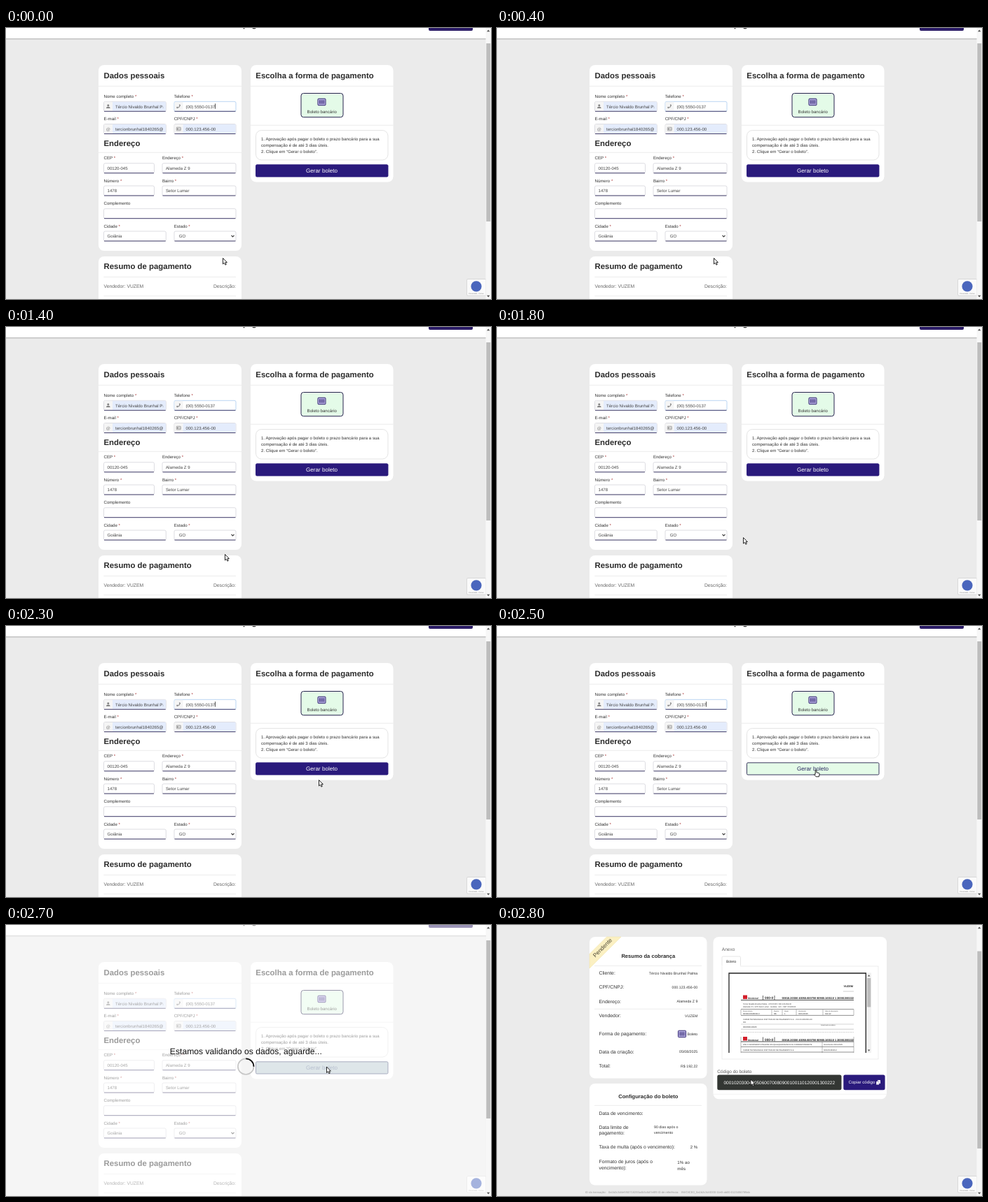
These frames come from a looping animation (692 px wide and 388 px high, 5.1 s). An HTML page:

```html
<!DOCTYPE html>
<html lang="pt-BR">
<head>
<meta charset="utf-8">
<title>Pagamento</title>
<style>
  html, body { margin: 0; width: 100%; height: 100%; overflow: hidden; background: #ebebeb; }
  svg { display: block; width: 100vw; height: 100vh; font-family: "Liberation Sans", Arial, sans-serif; text-rendering: geometricPrecision; }
  text { white-space: pre; }
</style>
</head>
<body>
<svg id="stage" viewBox="0 0 692 388"></svg>
<script>
const NAVY = '#2a1a7c', INK = '#333', LINE = '#e4e4e4';
const person = 'Tércio Nivaldo Brunhal Palma', vendor = 'VUZEM';
const taxId = '000.123.456-00', street = 'Alameda Z 9';
const digits = '00010203004005060070080900100110120001300222';

const rect = (x1, y1, x2, y2, fill, radius = 0, extra = '') =>
  `<rect x="${x1}" y="${y1}" width="${x2 - x1}" height="${y2 - y1}" rx="${radius}" fill="${fill}" ${extra}/>`;
const frame = (x1, y1, x2, y2, stroke, radius = 0, fill = 'none', width = .7) =>
  rect(x1, y1, x2, y2, fill, radius, `stroke="${stroke}" stroke-width="${width}"`);
const path = (d, extra) => `<path d="${d}" ${extra}/>`;
const rule = (x1, x2, y, color = LINE, width = .7) =>
  path(`M${x1} ${y}H${x2}`, `stroke="${color}" stroke-width="${width}"`);
const text = (x, y, content, size = 6.1, fill = INK, extra = '') =>
  `<text x="${x}" y="${y}" font-size="${size}" fill="${fill}" ${extra}>${content}</text>`;
const bold = (x, y, content, size, extra = '') =>
  text(x, y, content, size, '#2b2b2b', `font-weight="700" ${extra}`);
const end = (x, y, content, size = 5.25, fill = INK) => text(x, y, content, size, fill, 'text-anchor="end"');
const middle = 'text-anchor="middle"';
const card = (x1, y1, x2, y2) => rect(x1, y1, x2, y2, '#fff', 8);

const label = (x, y, content, required = true) =>
  text(x, y, content + (required ? ' <tspan fill="#a33">*</tspan>' : ''));

function field(x1, x2, y, value = '', { icon, filled, focus } = {}) {
  const clipId = `clip${x1}-${y}`.replace('.', '_');
  const left = icon ? x1 + 12.5 : x1;
  const textX = icon ? x1 + 16.5 : x1 + 5;
  return frame(x1, y, x2, y + 14, focus ? '#9dc3ee' : '#cfcfd6', 2, '#fff')
    + (icon ? rect(x1 + .5, y + .5, left, y + 13.2, '#f5f5f5', 1) : '')
    + (filled ? rect(left, y + .4, x2 - .4, y + 13.4, '#e4ecfc') : '')
    + rule(x1 + .5, x2 - .5, y + 14, '#35305f', .9)
    + (icon ? `<g transform="translate(${x1 + 6.3} ${y + 7})">${icon}</g>` : '')
    + `<clipPath id="${clipId}">${rect(x1, y, x2 - 4, y + 14, '#000')}</clipPath>`
    + text(textX, y + 9.3, value, 6.1, '#444', `clip-path="url(#${clipId})"`);
}

const GREY = '#858585';
const icons = {
  user: `<circle cy="-1.5" r="1.5" fill="${GREY}"/>` + path('M-2.7 2.8V2Q-2.5 .4-1 .4H1Q2.5 .4 2.7 2V2.8Z', `fill="${GREY}"`),
  phone: path('M-2.6 2.3Q1.4 1.8 2.2-2.3', `fill="none" stroke="${GREY}" stroke-width="1.2"`)
    + path('M-2.8 1.6l1.5-.8M1 -1.4l.8-1.3', `stroke="${GREY}" stroke-width="1.4"`),
  at: text(0, 2, '@', 6, GREY, middle),
  idCard: frame(-3, -2.3, 3, 2.3, GREY, .5) + rect(-2.1, -1.1, -.3, 1.2, GREY)
    + rule(.5, 2.3, -.7, GREY) + rule(.5, 2.3, .9, GREY)
};

const slipIcon = (x, y) => `<g transform="translate(${x} ${y})">`
  + frame(0, 0, 11, 9.5, '#31256f', 1, '#b9b2e4', 1)
  + path('M2.5 2v5.5M4.5 2v5.5M6.5 2v5.5M8.5 2v5.5', 'stroke="#31256f" stroke-width="1"') + '</g>';

const scrollbar = (top, bottom) => rect(684.5, 0, 692, 388, '#f7f7f7')
  + rect(685.3, top, 691.2, bottom, '#bdbdbd')
  + path('M686 5.2h4.4l-2.2-2.6zM686 382.8h4.4l-2.2 2.6z', 'fill="#555"');

const badge = rect(657.3, 359.3, 685.5, 383.5, '#d2d2d2', 1.5) + rect(658, 360, 684.5, 382.8, '#fafafa', 1)
  + '<circle cx="671" cy="369.8" r="7.6" fill="#4a66bd"/>'
  + text(671, 380.8, 'Privacidade - Termos', 2.3, '#777', middle);

function checkout() {
  return rect(0, 0, 692, 388, '#ebebeb')
    + rect(0, 0, 685, 15, '#fff') + rule(0, 685, 15.4, '#b5b5b5', 1) + rule(0, 685, 16.4, '#dcdcdc', 1)
    + bold(338, -1.4, 'pag', 11) + rect(603, -8, 666, 4, '#2b1c66', 2)
    + card(132, 53, 336, 319) + card(132, 327, 336, 400) + card(349, 53, 552.5, 220.5)
    + bold(139.5, 71.5, 'Dados pessoais', 11.4) + rule(132, 336, 83.3)
    + label(139.5, 100, 'Nome completo') + label(239.7, 100, 'Telefone')
    + field(139.5, 228.3, 105.3, person, { icon: icons.user, filled: true })
    + field(240, 328, 105.3, '(00) 5550-0137', { icon: icons.phone, focus: true })
    + label(139.5, 132.2, 'E-mail') + label(239.7, 132.2, 'CPF/CNPJ')
    + field(139.5, 228.3, 137.5, 'tercionbrunhal1840265@', { icon: icons.at, filled: true })
    + field(240, 328, 137.5, taxId, { icon: icons.idCard, filled: true })
    + bold(139.5, 169, 'Endereço', 11.4) + rule(132, 336, 178.3)
    + label(139.5, 188.2, 'CEP') + label(222.9, 188.2, 'Endereço')
    + field(139.5, 211.5, 193.7, '00120-045') + field(223, 328, 193.7, street)
    + label(139.5, 220.5, 'Número') + label(222.9, 220.5, 'Bairro')
    + field(139.5, 211.5, 226, '1478') + field(223, 328, 226, 'Setor Lumar')
    + label(139.5, 253.3, 'Complemento', false) + field(139.5, 328, 258.7)
    + label(139.5, 285.5, 'Cidade') + label(239.7, 285.5, 'Estado')
    + field(139.5, 228.3, 291, 'Goiânia') + field(240, 328, 291, ' GO')
    + path('M321.5 296.9l2 2 2-2', 'fill="none" stroke="#333" stroke-width="1.1"')
    + bold(139.5, 344.7, 'Resumo de pagamento', 11.4) + rule(139.5, 328, 356.5)
    + text(139.5, 372.2, 'Vendedor: ' + vendor, 6.8, '#666') + end(328, 372.2, 'Descrição:', 6.8, '#666')
    + rule(139.5, 328, 383.7)
    + bold(356.3, 71.5, 'Escolha a forma de pagamento', 11.4) + rule(349, 552.5, 83.3)
    + frame(421, 93.5, 481, 127.7, '#28234f', 3.5, '#e4fbe8', 1)
    + slipIcon(445, 101.2) + text(450.8, 122, 'Boleto bancário', 6.1, INK, middle) + rule(349, 552.5, 139.2)
    + frame(356.5, 146.5, 545, 189, '#d9d9d9', 8)
    + text(364, 160.8, '1. Aprovação após pagar o boleto o prazo bancário para a sua')
    + text(364, 169.9, 'compensação é de até 3 dias úteis.')
    + text(364, 179, '2. Clique em “Gerar o boleto”.')
    + '<g id="button"></g>'
    + `<path id="caret" d="M298.5 108.3v7.4" stroke="#222" stroke-width=".8"/>`;
}

function slip(y) {
  return rect(351, y - 5.5, 357, y, '#d3202c') + bold(358, y, 'Montenal', 3.4)
    + bold(382, y, '000-0', 4.8) + path(`M379.5 ${y - 5}v6M396 ${y - 5}v6`, 'stroke="#222" stroke-width=".7"')
    + end(509, y, '<tspan font-weight="700">00010.20300 40050.600700 80900.100110 1 20001300222</tspan>', 3.9, '#111')
    + rule(348, 509, y + 1.5, '#222', .8);
}

function slipDocument() {
  const tiny = (x, y, content, size = 2.6) => text(x, y, content, size, '#222');
  const columns = [348, 392, 407, 427, 465, 509];
  return '<clipPath id="page">' + rect(331, 68, 527, 183, '#000') + '</clipPath><g clip-path="url(#page)">'
    + rect(331, 68, 527, 183, '#fff')
    + end(508, 89.3, `<tspan font-weight="700">${vendor}</tspan>`, 3.9, '#222') + rule(494, 509, 95, '#999', .5)
    + slip(106)
    + tiny(351, 113.6, `${person} - CPF/CNPJ: ${taxId}`)
    + tiny(351, 117.6, `${street}, 1478 Setor Lumar - Goiânia - GO - CEP: 00120045`)
    + rule(348, 509, 120.6, '#444', .6)
    + ['Nosso número', 'Espécie', 'Quant.', 'Vencimento', 'Valor do documento'].map((name, i) =>
        tiny(columns[i] + 3, 123.8, name, 2.1)
        + tiny(columns[i] + 3, 127.5, ['00/00120045006-0', 'R$', '1', '03/11/2025', '192,22'][i], 2.8)).join('')
    + path(columns.map(x => `M${x} 121v8`).join(''), 'stroke="#777" stroke-width=".5"')
    + rule(348, 509, 129.4, '#444', .6)
    + tiny(351, 135.8, `${vendor} TECNOLOGIA E INSTITUICAO DE PAGAMENTO S.A. - 00.120.045/0001-00`)
    + tiny(351, 140, '001') + rule(348, 509, 142, '#aaa', .5)
    + tiny(351, 147.2, '000/000120045', 2.8) + tiny(462, 144.2, 'Autenticação mecânica', 2)
    + rule(348, 509, 149.2, '#999', .5)
    + path('M348 153.5H509', 'stroke="#999" stroke-width=".5" stroke-dasharray="1.5 1"')
    + slip(165.5)
    + tiny(351, 172, 'ATE O VENCIMENTO PAGAVEL EM QUALQUER BANCO OU CORRESPONDENTE') + tiny(466, 172, 'Vencimento 03/11/2025')
    + rule(348, 509, 174.3, '#444', .6)
    + tiny(351, 180, `${vendor} TECNOLOGIA E INSTITUICAO DE PAGAMENTO S.A.`) + tiny(466, 180, '0001/0120045-0')
    + path('M464 167v16M348 160v23M509 160v23', 'stroke="#777" stroke-width=".5"')
    + rule(348, 509, 182, '#444', .6) + '</g>'
    + path('M331 183V69H526.3V183', 'fill="none" stroke="#222" stroke-width="1.3"')
    + rect(527, 68.5, 534, 183, '#f1f1f1') + rect(528, 76, 533.3, 117.5, '#bdbdbd')
    + path('M528.8 73.5h3.6l-1.8-2.2zM528.8 178.5h3.6l-1.8 2.2z', 'fill="#555"');
}

function invoice() {
  const rows = [['Cliente:', person, 71], ['CPF/CNPJ:', taxId, 91], ['Endereço:', street, 111.5], ['Vendedor:', vendor, 132.2],
    ['Forma de pagamento:', 'Boleto', 158.3], ['Data da criação:', '05/08/2025', 183.7], ['Total:', 'R$ 192,22', 204]];
  return rect(0, 0, 692, 388, '#ebebeb')
    + card(132, 17, 299.5, 219.5) + card(132, 227, 299.5, 372.5) + card(308.5, 17, 556, 249.3)
    + path('M156.5 17H177L132 62V41.5Z', 'fill="#fbf0c2" stroke="#efe2a6" stroke-width=".5"')
    + text(0, 0, 'Pendente', 8.1, '#4a4634', `${middle} transform="translate(152.4 34.6) rotate(-45)"`)
    + bold(215.8, 47.2, 'Resumo da cobrança', 7.6, middle) + rule(139, 292, 58.4) + rule(139, 292, 120.3)
    + rows.map(([name, value, y]) => text(145.5, y, name, 6.9) + end(286.3, y - .5, value)).join('')
    + slipIcon(258.5, 151.2)
    + bold(215.8, 247.6, 'Configuração do boleto', 7.6, middle) + rule(139, 292, 258.4)
    + text(145.5, 271.5, 'Data de vencimento:', 6.9)
    + text(145.5, 291.6, 'Data limite de', 6.9) + text(145.5, 299.8, 'pagamento:', 6.9)
    + text(224, 291.2, '90 dias após o', 5.3) + text(224, 299.2, 'vencimento', 5.3)
    + text(145.5, 320, 'Taxa de multa (após o vencimento):', 6.85) + end(286.3, 320.2, '2 %', 6.1)
    + text(145.5, 341.4, 'Formato de juros (após o', 6.85) + text(145.5, 349.8, 'vencimento):', 6.85)
    + text(257.3, 341.7, '1% ao', 6.2) + text(257.3, 350.7, 'mês', 6.2)
    + text(126, 383.5, 'ID da transação:   0a1b2c3d4e5f60718293a4b5c6d7e8f9 ID de referência:   INVOICE0_0a1b2c3d-0000-11e0-ab00-0123456789ab', 4.05, '#999')
    + text(320.8, 36.6, 'Anexo', 6.6, '#666')
    + frame(321, 59, 544, 192, LINE) + frame(321, 45, 347.5, 59, '#dcdcdc', 1.5, '#fff')
    + rect(321.4, 58, 347.1, 60, '#fff') + text(334.2, 54, 'Boleto', 5.1, INK, middle)
    + slipDocument()
    + text(314.3, 212, 'Código do boleto', 6.5, '#555')
    + rect(314.3, 214.5, 491.5, 236.3, '#333633', 2.5) + text(323.5, 227.5, digits, 6.5, '#fff')
    + rect(494.3, 214.5, 553.6, 236.3, NAVY, 2.5) + text(501.5, 227.4, 'Copiar código', 6.15, '#fff')
    + rect(543, 222, 547, 227, '#fff', .6) + rect(541, 223.7, 545.2, 228.8, '#fff', .6, `stroke="${NAVY}" stroke-width=".4"`)
    + rule(308.5, 556, 242.3, '#ececec');
}

const button = (fill, ink, border) => frame(356.5, 195.8, 545, 213, border, 1.5, fill, .9) + text(450.5, 207.4, 'Gerar boleto', 8.1, ink, middle);
const buttons = {
  idle: button(NAVY, '#fff', NAVY),
  hover: button('#e4fbe8', '#2a2760', '#28234f'),
  pressed: button('#bacbd0', '#66779a', '#39406e')
};

const waiting = rect(0, 0, 684.5, 388, '#fff', 0, 'opacity=".53"')
  + text(342.3, 184.8, 'Estamos validando os dados, aguarde...', 12.16, '#111', middle)
  + '<circle cx="342.2" cy="202.7" r="11.3" fill="#f3f3f3" fill-opacity=".6" stroke="#c6c6c6" stroke-width="1.7"/>'
  + path('M342.2 191.4a11.3 11.3 0 0 1 11.3 11.3', 'fill="none" stroke="#111" stroke-width="1.7"');

const outline = 'fill="#fff" stroke="#111" stroke-width=".9" stroke-linejoin="round"';
const arrow = path('M.5 .5V9l2-1.8 1.4 3 1.4-.7L4 6.6H6.4Z', outline);
const hand = path('M-.8 6V.9Q0-.4 .9 .9V4L4.2 4.7Q5.2 5 5.1 6.3L4.4 10H.1L-2.6 6.8Q-2.2 5.4-.8 6.8Z', outline);

const stage = document.getElementById('stage');
stage.innerHTML = `<g id="checkout">${checkout()}</g><g id="waiting">${waiting}</g><g id="invoice">${invoice()}</g>`
  + badge + '<g id="bar"></g><g id="cursor"></g>';
const part = Object.fromEntries([...stage.querySelectorAll('g[id], #caret')].map(node => [node.id, node]));
const show = (node, visible) => { node.style.display = visible ? '' : 'none'; };
const fill = (node, markup) => {
  if (node.markup !== markup) node.innerHTML = node.markup = markup;
};

// [time, x, y]; the pointer rests between pairs with equal positions
const track = [[0, 309, 329], [600, 309, 329], [800, 312, 325], [1700, 312, 325], [1800, 351, 301],
  [2000, 402, 259], [2300, 446, 220], [2400, 453, 209], [2600, 457, 202.5], [2700, 457, 202.5], [2800, 361.5, 220.5]];

function pointerAt(time) {
  const next = track.findIndex(([t]) => t > time);
  if (next < 0) return track.at(-1).slice(1);
  const [t0, x0, y0] = track[next - 1], [t1, x1, y1] = track[next];
  const k = (time - t0) / (t1 - t0);
  return [x0 + (x1 - x0) * k, y0 + (y1 - y0) * k];
}

function draw(now) {
  const time = Math.floor(now % 5100 / 100) * 100;
  const paid = time >= 2800, validating = time >= 2700 && !paid;
  const hovering = time >= 2400 && time < 2700;
  show(part.checkout, !paid);
  show(part.waiting, validating);
  show(part.invoice, paid);
  show(part.caret, Math.floor((time + 400) / 600) % 2 === 0);
  fill(part.button, validating ? buttons.pressed : hovering ? buttons.hover : buttons.idle);
  fill(part.bar, paid ? scrollbar(37.5, 320) : scrollbar(22, 277));
  fill(part.cursor, hovering ? hand : arrow);
  part.cursor.setAttribute('transform', `translate(${pointerAt(time)})`);
  badgeVeil.style.display = validating ? '' : 'none';
}

const badgeVeil = document.createElementNS('http://www.w3.org/2000/svg', 'rect');
for (const [name, value] of Object.entries({ x: 657, y: 359, width: 27.5, height: 25, fill: '#fff', opacity: .5 }))
  badgeVeil.setAttribute(name, value);
stage.insertBefore(badgeVeil, part.bar);

const start = performance.now();
(function tick() {
  draw(performance.now() - start);
  requestAnimationFrame(tick);
})();
</script>
</body>
</html>
```
